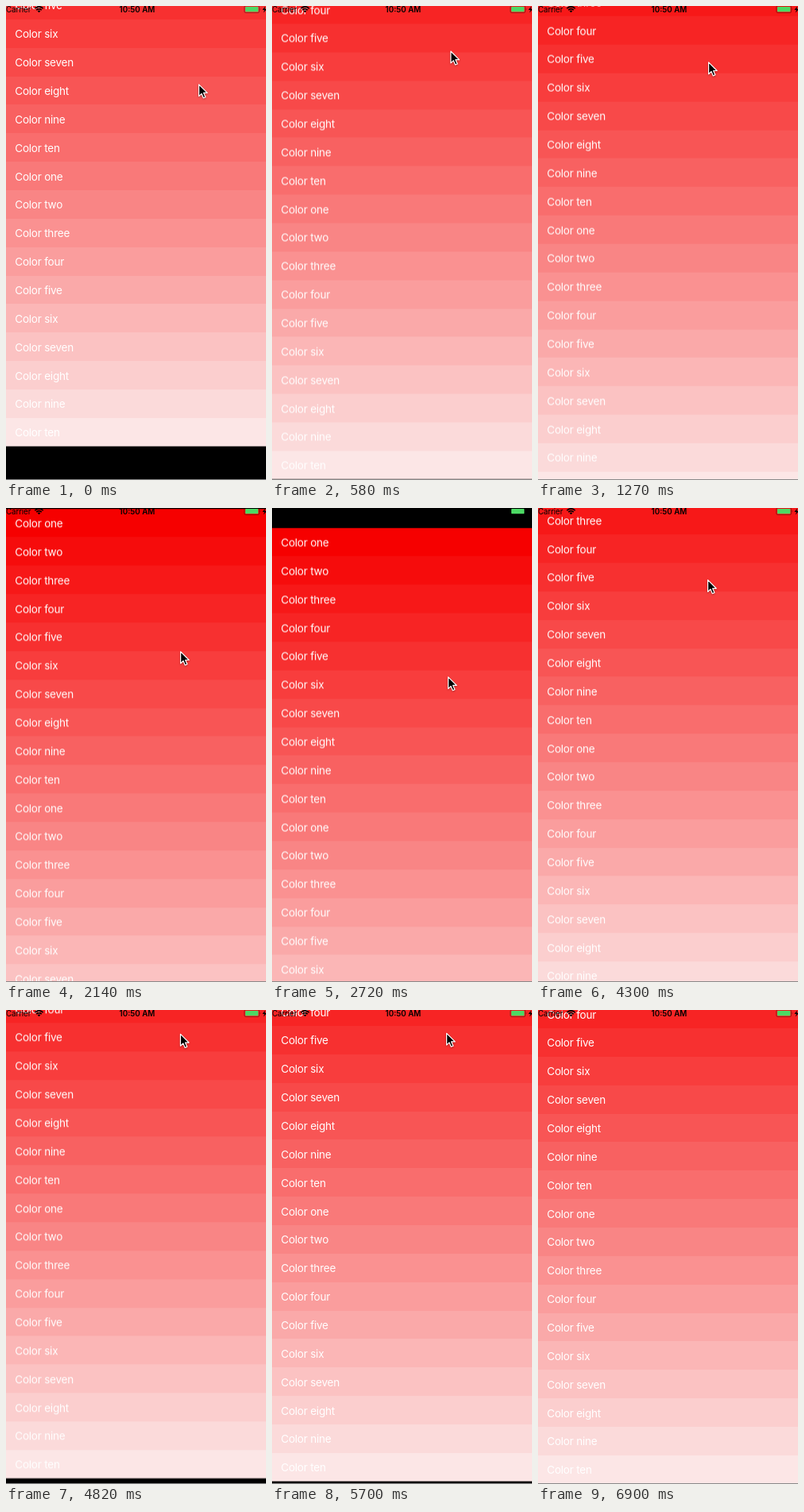
Animation of 327x597 px, one loop 7000 ms. Source, as an HTML page:

```html
<!DOCTYPE html>
<html lang="en">
<head>
<meta charset="utf-8">
<title>Color list</title>
<style>
  html, body { margin: 0; width: 100%; height: 100%; overflow: hidden; background: #000; }
  #stage { position: relative; width: 327px; height: 597px; overflow: hidden; background: #000; font-family: Inter, Roboto, sans-serif; }
  #list { position: absolute; left: 0; top: 0; width: 100%; will-change: transform; }
  #list div { position: relative; top: 1px; padding-left: 11.3px; color: #fff; font-size: 13.5px; letter-spacing: -0.22px; white-space: pre; }
  #bar { position: absolute; left: 0; top: 0; }
  #bar text { font-size: 9.8px; }
  #edge { position: absolute; left: 0; top: 596px; width: 100%; height: 1px; background: #888; }
  #cursor { position: absolute; left: -.6px; top: 0; overflow: visible; filter: drop-shadow(0 1px 1px rgba(0, 0, 0, .3)); }
</style>
</head>
<body>
<div id="stage">
  <div id="list"></div>
  <svg id="bar" width="327" height="12">
    <text x="0" y="8.4" letter-spacing="-.12">Carrier</text>
    <g fill="none" stroke="#000" stroke-width="1.6">
      <path d="M36.3 3.1Q41.5 -1.5 46.7 3.1M38.2 5.1Q41.5 2.2 44.8 5.1"/>
      <path d="M39.6 6.2Q41.5 4.6 43.4 6.2L41.5 8.3Z" fill="#000" stroke="none"/>
    </g>
    <text x="165" y="8.4" text-anchor="middle" font-weight="600">10:50 AM</text>
    <rect x="299.8" y="-.3" width="18.8" height="8.8" rx="1.8" fill="none" stroke="#000" stroke-opacity=".5" stroke-width=".7"/>
    <rect x="301" y="1" width="16.3" height="6.2" rx=".8" fill="#4cd964"/>
    <path d="M319.6 2.8Q321.2 4.1 319.6 5.5Z" opacity=".5"/>
    <path d="M326 .4L322.4 5H325L323.8 8.6L328 3.8H325.4Z"/>
  </svg>
  <div id="edge"></div>
  <svg id="cursor" width="13" height="20">
    <path d="M.6 .8V15.6L4 12.4L6.3 17.8L8.9 16.7L6.6 11.4H11.2Z" stroke="#fff" stroke-width="1.2" stroke-linejoin="round"/>
  </svg>
</div>
<script>
const LOOP = 7000, ROW = 35.86, COUNT = 20;
const REST_TOP = 26.2, REST_END = -102.5;   // centre of the first row at either end
const names = 'one two three four five six seven eight nine ten'.split(' ');
const list = document.getElementById('list');
const cursor = document.getElementById('cursor');

const bands = [];
for (let i = 0; i < COUNT; i++) {
  const row = document.createElement('div');
  row.textContent = 'Color ' + names[i % names.length];
  row.style.cssText = `height:${ROW}px;line-height:${ROW}px`;
  list.append(row);
  const red = Math.round(246 + i * 0.3), tint = Math.round(i * 12.1);
  bands.push(`rgb(${red},${tint},${tint}) ${i * ROW}px ${(i + 1) * ROW}px`);
}
list.style.height = ROW * COUNT + 'px';
list.style.background = `linear-gradient(${bands})`;

// Smooth monotone curve through [time, value] points
function curve(points) {
  const slope = i => (points[i + 1][1] - points[i][1]) / (points[i + 1][0] - points[i][0]);
  const tangent = points.map((p, i) => {
    if (i === 0 || i === points.length - 1) return 0;
    const a = slope(i - 1), b = slope(i);
    return a * b <= 0 ? 0 : 2 * a * b / (a + b);
  });
  return t => {
    if (t <= points[0][0]) return points[0][1];
    const i = points.findIndex(p => p[0] > t) - 1;
    if (i < 0) return points[points.length - 1][1];
    const [t0, v0] = points[i], [t1, v1] = points[i + 1];
    const d = t1 - t0, u = (t - t0) / d, w = 1 - u;
    return v0 * (1 + 2 * u) * w * w + v1 * u * u * (3 - 2 * u)
      + d * u * w * (tangent[i] * w - tangent[i + 1] * u);
  };
}

// Critically damped return after an overscroll
function bounce(t, start, from, to) {
  const x = Math.max(0, t - start) * 0.012;
  return to + (from - to) * (1 + x) * Math.exp(-x);
}

const dragDown = curve([[880, REST_END], [1270, -77], [2140, 18.8], [2720, 43]]);
const dragUp = curve([[3680, REST_TOP], [4300, -56.2], [4880, -110.2]]);

function scroll(t) {
  if (t < 880) return bounce(t, 60, -144.5, REST_END);
  if (t < 3190) return dragDown(t);
  if (t < 3680) return bounce(t, 3190, 43, REST_TOP);
  if (t < 5530) return dragUp(t);
  return bounce(t, 5530, -110.2, REST_END);
}

const path = [
  [0, 243, 98], [60, 243, 98], [860, 217, 40], [1270, 215, 70], [2140, 220, 180],
  [2720, 222, 212], [3190, 222, 212], [3660, 219, 175], [4300, 214, 90],
  [4880, 220, 28.5], [5700, 220, 28.5], [6190, 310, 588], [6240, 320, 640]
];
const cursorX = curve(path.map(p => [p[0], p[1]]));
const cursorY = curve(path.map(p => [p[0], p[2]]));

function draw() {
  const t = performance.now() % LOOP;
  list.style.transform = `translateY(${(scroll(t) - ROW / 2).toFixed(2)}px)`;
  cursor.style.transform = `translate(${cursorX(t).toFixed(2)}px, ${cursorY(t).toFixed(2)}px)`;
  requestAnimationFrame(draw);
}
draw();
</script>
</body>
</html>
```
